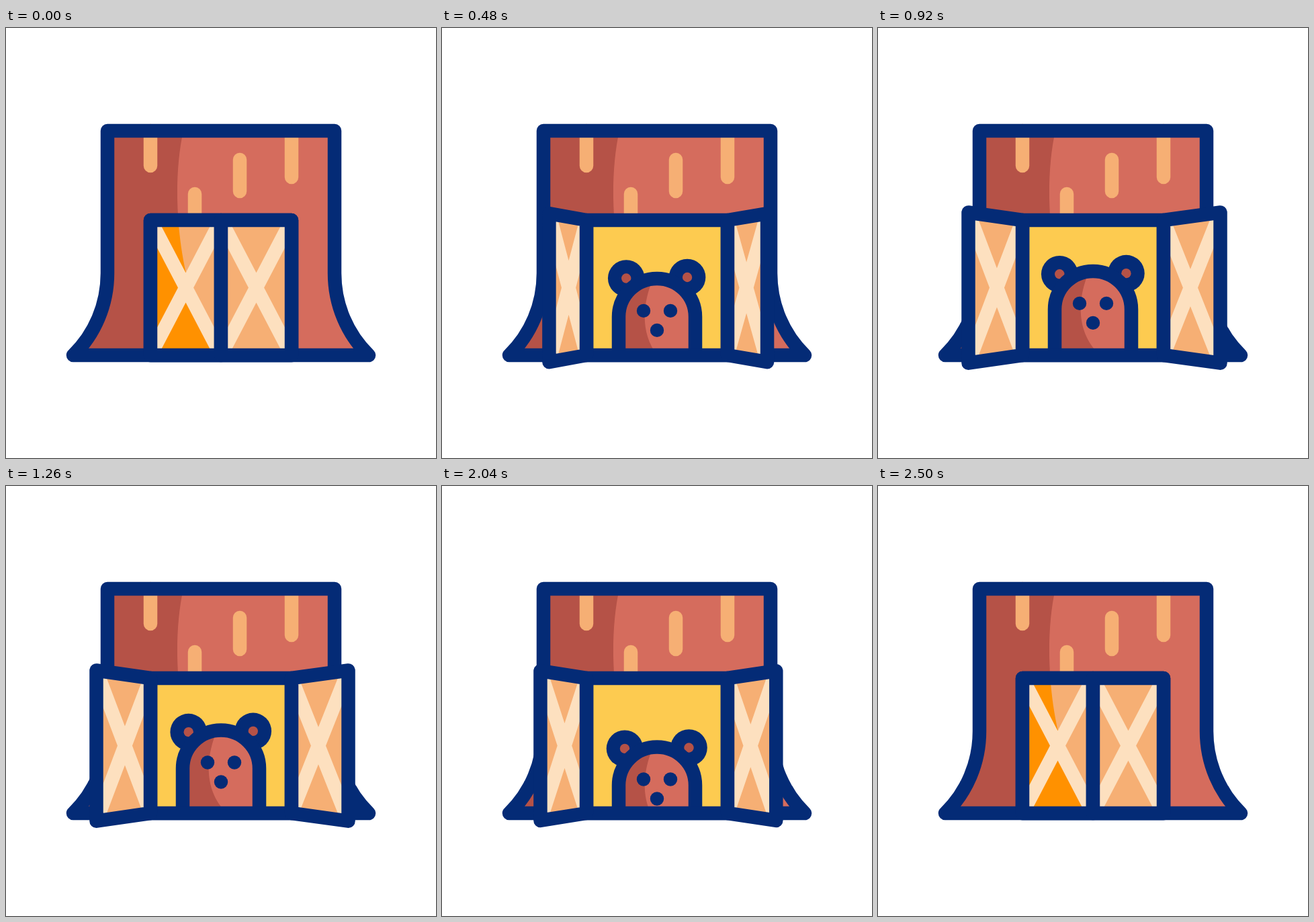
Recreate the animation shown at these times as an HTML page. Size 640x640 px, loop 3600 ms.

```html
<!DOCTYPE html>
<html lang="en">
<head>
<meta charset="utf-8">
<title>Bear in a tree stump</title>
<style>
  html, body { margin: 0; width: 100%; height: 100%; overflow: hidden; background: #fff; }
  svg { display: block; width: 100vw; height: 100vh; }
  .line { fill: none; stroke: #042b76; stroke-width: 20.5; stroke-linejoin: round; }
  .navy { fill: #042b76; }
  .bark { fill: #d56c5d; }
  .dark { fill: #b55247; }
  .wood { fill: #f6af74; }
  .amber { fill: #ff9100; }
  .mark { stroke: #f6af74; stroke-width: 20.5; stroke-linecap: round; }
  .cross { fill: none; stroke: #fde0bf; stroke-width: 20.5; }
</style>
</head>
<body>
<svg viewBox="0 0 640 640">
  <defs>
    <path id="stump" d="M151 153H489V365C489 412 508 456 540 487H100C132 456 151 412 151 365Z"/>
    <path id="shade" d="M90 153H264C250 215 253 300 268 365S300 450 325 487H90Z"/>
    <path id="body" d="M263 250V67A57 57 0 0 1 377 67V250Z"/>
    <clipPath id="inStump"><use href="#stump"/></clipPath>
    <clipPath id="inBody"><use href="#body"/></clipPath>
    <clipPath id="inRoom"><rect x="215" y="286" width="210" height="201"/></clipPath>
    <clipPath id="inLeft"><path id="leftClip"/></clipPath>
    <clipPath id="inRight"><path id="rightClip"/></clipPath>
  </defs>

  <use href="#stump" class="bark"/>
  <use href="#shade" class="dark" clip-path="url(#inStump)"/>
  <path class="mark" d="M215 153V205M281 247V290M348 196V243M425 153V222"/>
  <use href="#stump" class="line"/>

  <rect x="215" y="286" width="210" height="201" fill="#fdcb50"/>
  <g clip-path="url(#inRoom)">
    <g id="bear">
      <g id="leftEar"><circle class="navy" r="27.3"/><circle class="dark" r="7.2"/></g>
      <g id="rightEar"><circle class="navy" r="27.3"/><circle class="dark" r="7.2"/></g>
      <use href="#body" class="bark"/>
      <path class="dark" clip-path="url(#inBody)" d="M260 0H319C296 45 291 103 335 139L350 250H260Z"/>
      <use href="#body" class="line"/>
      <g class="navy">
        <circle cx="300" cy="58" r="10.2"/>
        <circle cx="340" cy="58" r="10.2"/>
        <circle cx="320" cy="87" r="10.2"/>
      </g>
    </g>
  </g>
  <rect class="line" x="215" y="286" width="210" height="201"/>

  <g clip-path="url(#inLeft)">
    <path id="leftPanel" class="wood"/>
    <use id="leftShade" href="#shade" class="amber"/>
    <path id="leftCross" class="cross"/>
  </g>
  <path id="leftFrame" class="line"/>
  <g clip-path="url(#inRight)">
    <path id="rightPanel" class="wood"/>
    <path id="rightCross" class="cross"/>
  </g>
  <path id="rightFrame" class="line"/>
</svg>
<script>
const LOOP = 3600, TOP = 286, BOTTOM = 487;
const el = id => document.getElementById(id);
const clamp = v => Math.min(1, Math.max(0, v));
const mix = (a, b, k) => a + (b - a) * k;
const span = (t, start, end) => clamp((t - start) / (end - start));
const smooth = u => u * u * (3 - 2 * u);
const easeOut = u => 1 - (1 - u) ** 2;

// cubic-bezier(.363, 0, .176, 1), solved by bisection
function swing(u) {
  let lo = 0, hi = 1;
  for (let i = 0; i < 24; i++) {
    const s = (lo + hi) / 2, r = 1 - s;
    const x = 3 * r * r * s * 0.363 + 3 * r * s * s * 0.176 + s ** 3;
    if (x < u) lo = s; else hi = s;
  }
  return smooth((lo + hi) / 2);
}

function doorOpen(t) {
  if (t <= 80 || t >= 2500) return 0;
  return t < 1820 ? swing(span(t, 80, 780)) : swing(1 - span(t, 1820, 2520));
}

function headTop(t) {
  if (t < 600) return mix(520, 337.7, easeOut(span(t, 280, 600)));
  if (t < 1820) return mix(337.7, 353.5, smooth(span(t, 600, 1000)));
  return mix(353.5, 520, span(t, 1820, 2390) ** 2);
}

// Positive lifts the ears inwards, negative drops them outwards
function earSway(t) {
  if (t < 600) return mix(-0.6, 1, smooth(span(t, 300, 600)));
  if (t < 910) return mix(1, -0.35, smooth(span(t, 600, 910)));
  return mix(-0.35, 0, smooth(span(t, 910, 1380)));
}

function drawDoor(side, hinge, openX, open) {
  const x = mix(320, openX, open);
  const top = mix(TOP, 274.5, open), bottom = mix(BOTTOM, 498.7, open);
  const quad = `M${hinge} ${TOP}L${x} ${top}V${bottom}L${hinge} ${BOTTOM}Z`;
  for (const part of ["Clip", "Panel", "Frame"]) el(side + part).setAttribute("d", quad);
  el(side + "Cross").setAttribute("d",
    `M${hinge} ${TOP}L${x} ${bottom}M${hinge} ${BOTTOM}L${x} ${top}`);
  return (x - hinge) / (320 - hinge);
}

function place(id, x, y) {
  el(id).setAttribute("transform", `translate(${x} ${y})`);
}

function draw(t) {
  const open = doorOpen(t);
  const facing = drawDoor("left", 215, 134.5, open);
  drawDoor("right", 425, 509.5, open);
  const shade = el("leftShade");
  shade.style.display = facing > 0 ? "" : "none";
  shade.setAttribute("transform", `translate(215 0) scale(${Math.max(facing, 0.001)} 1) translate(-215 0)`);

  const sway = earSway(t);
  place("bear", 0, headTop(t));
  place("leftEar", 272 + 5 * sway, 12.3 - 6 * sway);
  place("rightEar", 367.5 - 5.5 * sway, 11 - 6.5 * sway);
}

const start = performance.now();
function tick() {
  draw((performance.now() - start) % LOOP);
  requestAnimationFrame(tick);
}
tick();
</script>
</body>
</html>
```
